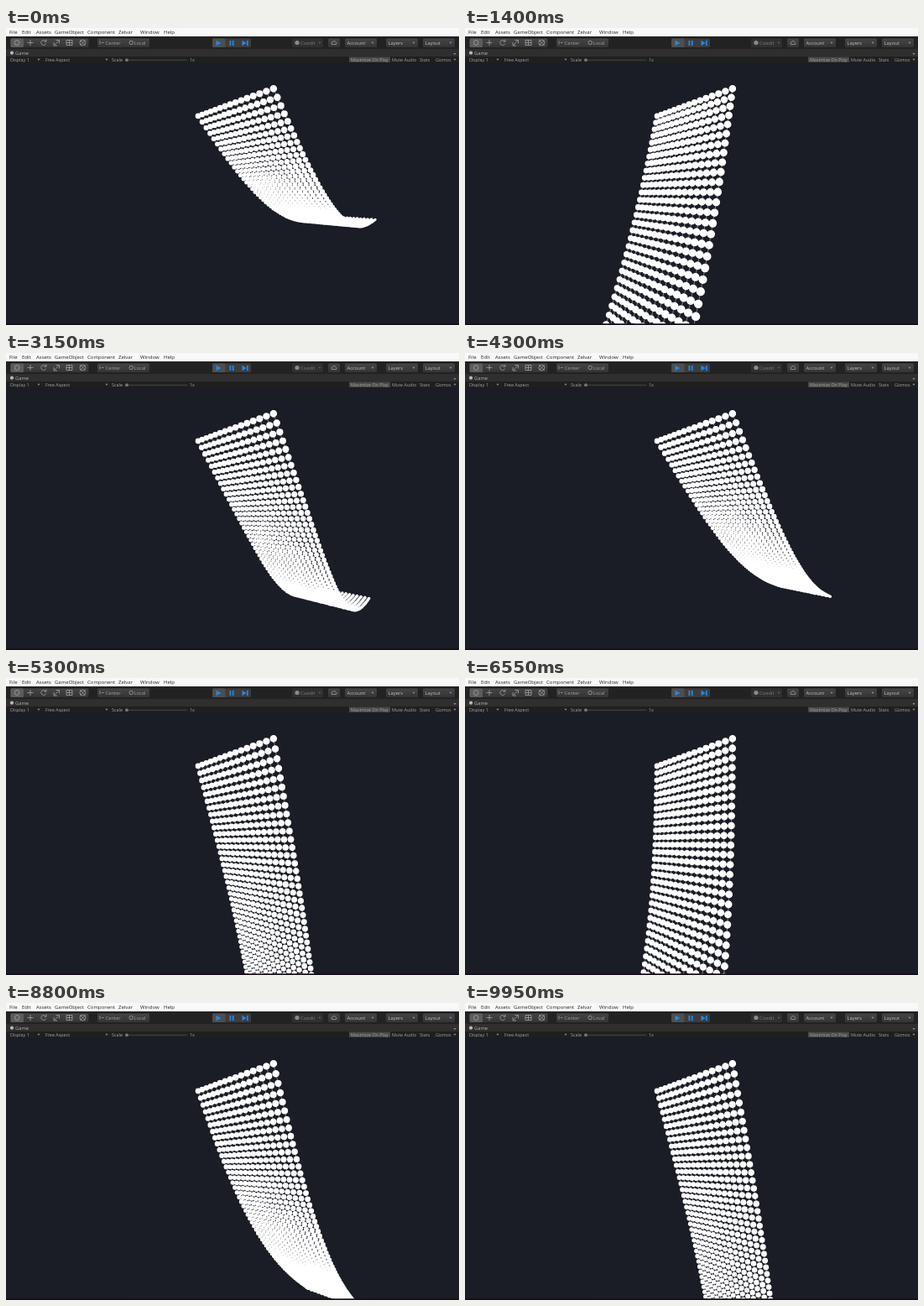
Write an HTML page that moves like this. It is 540 px wide and 354 px high and loops after 10000 ms.

```html
<!DOCTYPE html>
<html lang="en">
<head>
<meta charset="utf-8">
<title>Cloth swing</title>
<style>
html, body { margin: 0; width: 100%; height: 100%; overflow: hidden; background: #1a1d25; }
svg { display: block; width: 100vw; height: 100vh; }
text { font-family: "Open Sans", "Noto Sans", sans-serif; }
</style>
</head>
<body>
<svg viewBox="0 0 540 354" xmlns="http://www.w3.org/2000/svg">
  <defs>
    <linearGradient id="btn" x1="0" y1="0" x2="0" y2="1">
      <stop offset="0" stop-color="#454545"/>
      <stop offset="1" stop-color="#343434"/>
    </linearGradient>
    <clipPath id="view"><rect y="41" width="540" height="311.5"/></clipPath>
  </defs>
  <rect width="540" height="354" fill="#1a1d25"/>
  <g clip-path="url(#view)">
    <path id="links" fill="none" stroke="#fff" stroke-opacity=".6" stroke-width=".7"/>
    <path id="dots" fill="#fff"/>
  </g>
  <rect y="352.5" width="540" height="1.5" fill="#140c16"/>
  <rect width="540" height="10" fill="#f9f9f9"/>
  <rect y="10" width="540" height="15" fill="#232222"/>
  <rect y="25" width="540" height="9" fill="#302e2e"/>
  <rect y="34" width="540" height="7" fill="#201f20"/>
  <g id="ui"></g>
  <g fill="none" stroke="#a4a4a4" stroke-width=".8">
    <path d="M10.5 17.5q0-3 2.500-3t3 2.500q0 3.500-3 3.500t-2.500-3z"/>
    <path d="M25.500 17.500h7M29 14v7"/>
    <path d="M47.500 16a3 3 0 1 0 .2 2.500M48 13.500v2.700h-2.700"/>
    <path d="M57.500 20.500l5-5M59.500 14.500h4v4M57 17v4h4"/>
    <path d="M72 14.500h7v6h-7zM75.500 14.500v6M72 17.500h7"/>
    <path d="M88.500 14.500l6 6M94.500 14.500l-6 6M88 17.500a3.400 3.400 0 1 0 6.800 0a3.400 3.400 0 1 0-6.800 0"/>
    <path d="M112 15.500v4M114 17.500h2.500"/>
    <path d="M147 17.500a2.200 2.200 0 1 0 4.400 0a2.200 2.200 0 1 0-4.400 0"/>
    <path d="M388.500 19.500h5q1.500-1.500-.5-2.800q-1.500-2.500-3.500-.3q-2.500.6-1 3.100z"/>
  </g>
  <g fill="#2387e8">
    <path d="M250.500 14.800l6 3.200l-6 3.200z"/>
    <path d="M266.500 15h1.800v6h-1.800zM269.800 15h1.800v6h-1.800z"/>
    <path d="M281.500 14.800l5.200 3.200l-5.200 3.200zM287 15h1.700v6h-1.700z"/>
  </g>
  <circle cx="347" cy="17.5" r="2.6" fill="#8a8a8a"/>
  <circle cx="7" cy="29.7" r="2.1" fill="#b8b8b8"/>
  <path d="M142 38.200h74" stroke="#4c4c4c" stroke-width=".9"/>
  <circle cx="144" cy="38.200" r="1.900" fill="#777"/>
</svg>
<script>
const $ = id => document.getElementById(id);

// Editor chrome
function add(tag, attrs, label) {
  const el = document.createElementNS('http://www.w3.org/2000/svg', tag);
  for (const k in attrs) el.setAttribute(k, attrs[k]);
  if (label) el.textContent = label;
  $('ui').appendChild(el);
}
const text = (x, y, label, size, fill) => add('text', { x, y, 'font-size': size, fill }, label);
const button = (x, w, fill = 'url(#btn)') =>
  add('rect', { x, y: 12.5, width: w, height: 10.5, rx: 1.5, fill });
const arrow = (x, y, fill = '#999') => add('path', { d: `M${x - 1.5} ${y - 1}h3l-1.5 2z`, fill });
const labels = (items, y, size, fill) => items.forEach(([x, s]) => text(x, y, s, size, fill));

labels([[4, 'File'], [19, 'Edit'], [36, 'Assets'], [58, 'GameObject'], [97, 'Component'],
  [134, 'Zelvar'], [160, 'Window'], [188, 'Help']], 7.2, 6, '#222');

button(5.5, 93);
button(5.5, 15.5, '#5c5c5c');
button(109, 62);
button(246, 46, '#3c3c3c');
button(246, 15.5, '#4e4e4e');
button(341, 37, '#303030');
button(384, 14);
[[404, 'Account'], [453, 'Layers'], [497, 'Layout']].forEach(([x, s]) => {
  button(x, 38);
  text(x + 2.5, 19.7, s, 5.8, '#c4c4c4');
  arrow(x + 33, 17.8);
});
labels([[118.5, 'Center'], [152.5, 'Local']], 19.7, 5.8, '#a0a0a0');
text(351, 19.7, 'Coedit', 5.8, '#7c7c7c');
arrow(374, 17.8, '#666');

text(11, 31.9, 'Game', 5.8, '#b5b5b5');
add('rect', { x: 409, y: 34.5, width: 49, height: 6.3, fill: '#4a4a4a' });
labels([[5, 'Display 1'], [47, 'Free Aspect'], [126, 'Scale'], [219, '1x'],
  [411, 'Maximize On Play'], [460, 'Mute Audio'], [493, 'Stats'], [512, 'Gizmos']], 39.8, 5.4, '#a5a5a5');
[39, 120, 535].forEach(x => arrow(x, 37.8));
arrow(535, 31);

// Cloth: all columns share one profile. It hangs at the swing angle and
// turns by the curl angle towards its tip; a higher knee bends it later.
const COLS = 15, ROWS = 57, GAP = 1.05, RADIUS = .39;
const LOOP = 10, FOCAL = 268;
const poses = [
  { t: 0, swing: 48, curl: 46, knee: 1 },
  { t: 1.4, swing: -13, curl: -18, knee: 1 },
  { t: 1.9, swing: -35, curl: -14, knee: 1 },
  { t: 3.15, swing: 39, curl: 55, knee: 3 },
  { t: 3.7, swing: 54, curl: 48, knee: 1.5 },
  { t: 5.3, swing: 20, curl: -8, knee: 1 },
  { t: 6.55, swing: -1, curl: -20, knee: 1 },
  { t: 7.1, swing: -9, curl: -14, knee: 1 },
  { t: 8.8, swing: 27, curl: 28, knee: 1 },
  { t: 9.95, swing: 20, curl: -8, knee: 1 }
];
const smooth = f => f * f * (3 - 2 * f);

// Smooth curve through the poses
function poseAt(t) {
  const last = poses.length - 1;
  t = Math.min(t, poses[last].t);
  let i = 0;
  while (i < last - 1 && t >= poses[i + 1].t) i++;
  const a = poses[i], b = poses[i + 1], dt = b.t - a.t, p = (t - a.t) / dt;
  const slope = (j, k) => {
    const m = poses[Math.max(j - 1, 0)], n = poses[Math.min(j + 1, last)];
    return (n[k] - m[k]) / (n.t - m.t) * dt;
  };
  const value = k => a[k] + (b[k] - a[k]) * smooth(p) +
    p * (1 - p) * ((1 - p) * slope(i, k) - p * slope(i + 1, k));
  return { swing: value('swing'), curl: value('curl'), knee: Math.max(1, value('knee')) };
}

function profile(t) {
  const { swing, curl, knee } = poseAt(t);
  const pts = [];
  let u = 0, h = 11.35;
  for (let r = 0; r < ROWS; r++) {
    pts.push([u, h]);
    const a = (swing + curl * smooth((r + .5) / ROWS) ** knee) * Math.PI / 180;
    u += GAP * Math.sin(a);
    h -= GAP * Math.cos(a);
  }
  return pts;
}

function project(c, [u, h]) {
  const f = c / (COLS - 1);
  const z = 24.4 + 8.6 * f + .736 * u;
  if (z < 2) return null;
  const k = FOCAL / z;
  const x = 270 + k * (4.45 - 9.51 * f + .674 * u), y = 197 - k * h;
  return y > 380 ? null : { x, y, r: RADIUS * k };
}

const at = p => p.x.toFixed(2) + ' ' + p.y.toFixed(2);

function draw(t) {
  let dots = '', links = '', above = [];
  for (const pt of profile(t)) {
    const row = [];
    for (let c = 0; c < COLS; c++) {
      const p = project(c, pt);
      row.push(p);
      if (!p) continue;
      const r = p.r.toFixed(2), d = (2 * p.r).toFixed(2);
      dots += `M${(p.x - p.r).toFixed(2)} ${p.y.toFixed(2)}a${r} ${r} 0 1 0 ${d} 0a${r} ${r} 0 1 0 -${d} 0`;
      if (above[c]) links += `M${at(above[c])}L${at(p)}`;
      if (row[c - 1]) links += `M${at(row[c - 1])}L${at(p)}`;
    }
    above = row;
  }
  $('dots').setAttribute('d', dots);
  $('links').setAttribute('d', links);
}

const start = performance.now();
function tick() {
  const t = (performance.now() - start) / 1000 % LOOP;
  draw(Math.floor(t * 20 + .001) / 20);
  requestAnimationFrame(tick);
}
tick();
</script>
</body>
</html>
```
